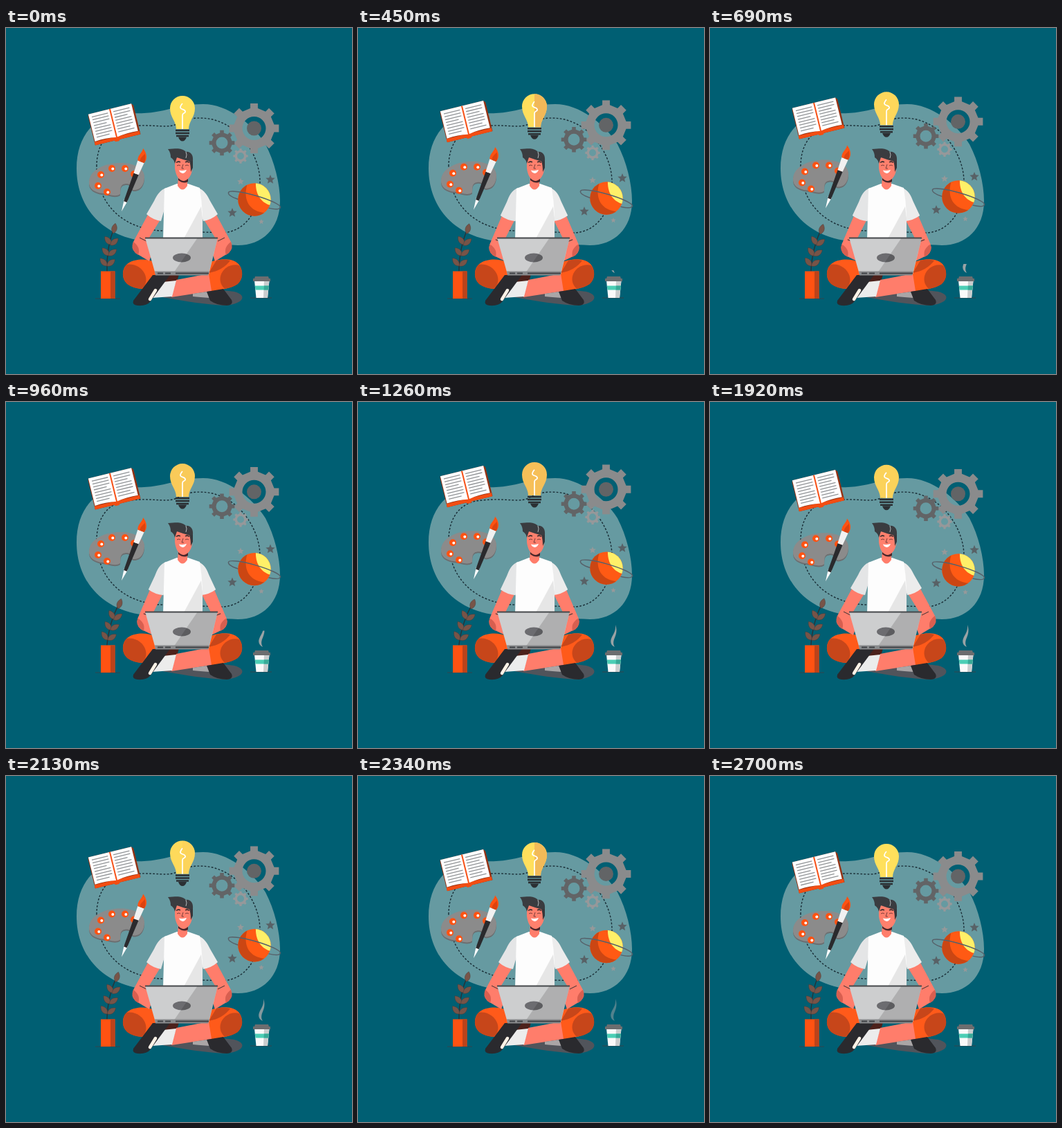
Recreate the animation shown at these times as an HTML page. Size 500x500 px, loop 2.73 s.

```html
<!DOCTYPE html>
<html lang="en">
<head>
<meta charset="utf-8">
<title>Creative work</title>
<style>
  html, body { margin: 0; width: 100%; height: 100%; overflow: hidden; background: #005f73; }
  svg { display: block; width: 100vw; height: 100vh; }
</style>
</head>
<body>
<svg viewBox="0 0 500 500">
  <defs>
    <clipPath id="planetClip"><circle cx="359" cy="248" r="23.7"/></clipPath>
    <clipPath id="bulbRight"><path d="M255 90H280V160H255Z"/></clipPath>
    <clipPath id="steamClip"><rect id="steamWindow" x="355" width="30" height="40"/></clipPath>
    <path id="bulbShape" d="M246 146C246 135 237 129 237 116A18 18 0 0 1 273 116C273 129 264 135 264 146Z"/>
    <path id="paletteShape" d="M120 222C121 205 143 195 165 195C186 195 200 203 200 215C200 226 195 233 187 234C178 235 184 226 175 225C163 225 166 234 165 240C158 245 148 240 140 239C128 238 119 232 120 222Z"/>
    <g id="limb">
      <path d="M206 268L184 309Q180 318 187 325L207 337L216 310L205 306L223 277Z" fill="#ff7d6b"/>
      <path d="M184 309Q180 318 187 325L191 328Q195 317 184 309Z" fill="#d85f50"/>
      <path d="M193 303L203 308" stroke="#3a3032"/>
    </g>
    <path id="sleeve" d="M232 231C222 234 218 242 214 250L203 269Q212 277 224 279L229 262Z"/>
  </defs>

  <path fill="#669aa1" d="M102 203C102 155 130 122 175 123C230 126 240 110 285 110C320 110 357 139 375 168C388 193 396 225 396 250C396 290 370 314 335 314C290 311 240 314 200 308C135 300 102 255 102 203Z"/>
  <path fill="none" stroke="#182c35" stroke-width="1.4" stroke-dasharray="2.8 2.3" d="M131 200C131 165 150 143 180 142C215 138 235 147 250 137C262 129 290 127 310 136C345 150 367 190 367 222C367 265 345 296 310 296C280 294 250 296 226 293C170 291 131 255 131 200Z"/>

  <g id="book"><g transform="translate(150 117) rotate(-13.8)">
    <path d="M-33 3L-32 0H32L34.500 3V46H-33Z" fill="#943416"/>
    <path d="M-33 41H34V46H4L2 48H-3L-5 46H-33Z" fill="#f24d12"/>
    <path d="M-32 0H32V40.500Q16 39 0 42Q-16 39 -32 40.500Z" fill="#fff"/>
    <path d="M0 0V43" stroke="#f65016" stroke-width="2"/>
    <path id="bookLines" stroke="#909396" stroke-width="1.3"/>
  </g></g>

  <g id="bulb">
    <use id="bulbGlass" href="#bulbShape"/>
    <use id="bulbShade" href="#bulbShape" fill="#f0b458" clip-path="url(#bulbRight)"/>
    <path d="M255 146V126C255 122 260 124 259 120C258 117 251 118 252 114Q253 111 255 109" fill="none" stroke="#fff" stroke-width="1.7"/>
    <path d="M245 148H265M245 152H265M246 156H264" stroke="#2b2f33" stroke-width="2.6"/>
    <path d="M249 157.500H261Q259 163.500 255 163.500Q251 163.500 249 157.500Z" fill="#2b2f33"/>
  </g>

  <g id="gears" fill-rule="evenodd"></g>

  <g id="palette">
    <use href="#paletteShape" y="2" fill="#6c6e70"/>
    <use href="#paletteShape" fill="#8b8b8b"/>
    <g id="paints"></g>
    <g transform="translate(167 265) rotate(21.3)">
      <path d="M0 0L-2.800 -18H2.800Z" fill="#fff"/>
      <path d="M-2.400 -15L-3.800 -58H3.800L2.400 -15Z" fill="#2a2a2d"/>
      <path d="M-3.800 -58L-5 -77H5L3.800 -58Z" fill="#f1f1f1"/>
      <path d="M-5 -77C-8 -85 -3 -88 -4 -96C3 -92 8 -85 5 -77Z" fill="#ff5212"/>
      <path d="M-1 -77C-4 -82 0 -85 1 -90C4 -85 6 -81 5 -77Z" fill="#dc4310"/>
    </g>
  </g>

  <g id="planet">
    <circle cx="359" cy="248" r="23.700" fill="#ff5a14"/>
    <g clip-path="url(#planetClip)">
      <path d="M350 222C341 246 350 265 374 267V274H335V222Z" fill="#cb4613"/>
      <path d="M361 222C360 242 370 254 385 257V222Z" fill="#fff068"/>
    </g>
    <path d="M-39 0A39 6.500 0 0 1 39 0M-39 0C-39 3 -33 5 -23 5.500M39 0C39 3 33 5 23 5.500" transform="translate(359 248.500) rotate(16)" fill="none" stroke="#56616a" stroke-width="1.500"/>
    <g id="stars"></g>
  </g>

  <path d="M129 391H165" stroke="#33454c"/>
  <g id="plant">
    <path d="M146 353C145 330 149 305 157 288" fill="none" stroke="#2b2f33" stroke-width="1.300"/>
    <g id="leaves" fill="#775448" stroke="#473a37" stroke-width=".4"></g>
  </g>
  <path d="M137 351.500H157.500V391H137Z" fill="#ff5212"/>
  <path d="M151 351.500H157.500V391H151Z" fill="#bc421a"/>

  <g clip-path="url(#steamClip)">
    <path id="steam" fill="#9aa3a5" d="M372 322C376 333 371 339 369.500 345C368.500 350 370 352 371 354C366 352 364 347 366 342C368 336 373 332 372 322Z"/>
  </g>
  <path d="M353 390H384" stroke="#33454c"/>
  <path d="M359 365H380.500L378 390H361.500Z" fill="#fafafa"/>
  <path d="M373 365H380.500L378 390H372Z" fill="#cacdce"/>
  <path d="M359.800 372.500H380L379 378.500H360.500Z" fill="#4bceb5"/>
  <path d="M373 372.500H380L379 378.500H372.600Z" fill="#38a997"/>
  <path d="M360 359H379L380 362H382V366H357V362H359Z" fill="#6c6d6f"/>

  <path d="M226 389C250 378 300 376 330 381C349 386 344 398 318 401C290 400 260 395 226 389Z" fill="#51545b"/>

  <path d="M214 338C200 331 169 333 169 355C169 374 190 379 215 377L230 350Z" fill="#ff5a1a"/>
  <path d="M174 342C167 350 167 363 175 370Q183 376 196 377C212 364 196 338 174 342Z" fill="#c7461a"/>
  <path d="M290 340C310 331 341 330 341 355C341 374 320 377 294 381Z" fill="#ff5a1a"/>
  <path d="M337 343C343 350 343 363 335 370Q328 375 316 377C300 362 316 338 337 343Z" fill="#c7461a"/>
  <path d="M293 354L304 336Q314 333 324 336Q314 350 293 354Z" fill="#c7461a"/>
  <path d="M216 356H250L246 370H216Z" fill="#4c211b"/>
  <path d="M246 364L293 355L297 380L239 389Z" fill="#ff7d6b"/>
  <path d="M270 384L291 381L294 390Q280 389 270 388Z" fill="#aaa6a7"/>
  <path d="M227 367L246 365L240 388L211 390Z" fill="#ececec"/>
  <path d="M212 357H237L208 396Q203 402 190 401Q182 400 184 394Z" fill="#2a2a2e"/>
  <path d="M208 392L216 379" stroke="#fff3e7" stroke-width="4.500" stroke-linecap="round"/>
  <path d="M290 381L314 377L326 393Q329 400 319 401Q305 401 295 394Z" fill="#2a2a2e"/>

  <g id="leftArm"><use href="#limb"/><use href="#sleeve" fill="#e4e5e6"/></g>
  <g transform="translate(509) scale(-1 1)">
    <g id="rightArm"><use href="#limb"/><use href="#sleeve" fill="#ececec"/></g>
  </g>
  <path d="M229 232L247 225Q255 229 263 225L280 231Q283 250 284 270V306H227Z" fill="#fdfdfd"/>
  <path d="M282 258L284 275V306H256Z" fill="#e6e6e6"/>

  <path d="M249 214H262V228Q255 239 248 228Z" fill="#ff7d6b"/>
  <path d="M249 216Q256 222 263 214V222Q257 226 249 220Z" fill="#4a262a"/>
  <path d="M244 189Q257 182 269 188V205C268 214 262 221 256 221C249 220 245 212 244 202Z" fill="#ff806d"/>
  <path d="M265 190H270V202L267 208Q267 198 265 192Z" fill="#35373b"/>
  <path d="M234 175C245 175 252 172 260 179C266 178 271 183 270 192L266 193Q255 190 247 187L244 196Q243 190 238 187Q238 180 234 175Z" fill="#3a3c40"/>
  <path d="M260 179Q262 183 260 188" fill="none" stroke="#c2c9ca" stroke-width=".9"/>
  <path d="M246 194.500Q249 192 252 194M259 194Q262 192 265 194.500" fill="none" stroke="#302b2e" stroke-width="1.500"/>
  <path d="M247 199Q250 197 252 199M259 199Q262 197 264 199M256 197L254 203H257" fill="none" stroke="#793d3b" stroke-width="1"/>
  <path d="M250 205.500Q255 207 261 205Q259 210 255 210Q251 209 250 205.500Z" fill="#fff"/>

  <path d="M201 303H306L293 356H216Z" fill="#cdcecf"/>
  <ellipse cx="254" cy="332" rx="13" ry="6.500" fill="#6c6c70"/>
  <path d="M277 303H306L293 354H242Z" fill="#000" opacity=".15"/>
  <path d="M201 303.500H306" stroke="#45484b" stroke-width="2"/>
  <path d="M215 351.500H294L292 357.500H216Z" fill="#898b8d"/>
  <path d="M219 354.500H227M230 354.500H238M245 354.500H293" stroke="#404347" stroke-width="2"/>
</svg>
<script>
const LOOP = 2730;
const $ = id => document.getElementById(id);
const polar = (cx, cy, r, a) => [cx + r * Math.cos(a), cy + r * Math.sin(a)].map(v => v.toFixed(2)).join(' ');
const circlePath = (x, y, r) => `M${x - r} ${y}a${r} ${r} 0 1 0 ${2 * r} 0a${r} ${r} 0 1 0 ${-2 * r} 0Z`;

function gear(x, y, outer, body, hole, color) {
  const points = [];
  for (let i = 0; i < 8; i++) {
    const a = i * Math.PI / 4;
    const half = outer * 0.15;
    for (const [r, side] of [[body, -1], [outer, -1], [outer, 1], [body, 1]])
      points.push(polar(x, y, r, a + side * Math.asin(half / r)));
  }
  return `<path fill="${color}" d="M${points.join('L')}Z${circlePath(x, y, hole)}"/>`;
}

function star(x, y, r, color) {
  const points = Array.from({ length: 10 }, (_, i) =>
    polar(x, y, i % 2 ? r * 0.45 : r, i * Math.PI / 5 - Math.PI / 2));
  return `<path fill="${color}" d="M${points.join('L')}Z"/>`;
}

const paint = ([x, y]) =>
  `<circle cx="${x}" cy="${y}" r="5" fill="#ff5212"/><circle cx="${x + 1.3}" cy="${y + .5}" r="2" fill="#fff"/>`;

const leaf = ([x, y, angle]) =>
  `<path transform="translate(${x} ${y}) rotate(${angle})" d="M0 0C-5 -4 -5 -10 0 -15C5 -10 5 -4 0 0Z"/>`;

$('gears').innerHTML =
  gear(358.5, 145, 36.3, 29.5, 17, '#8a8b8c') +
  '<circle cx="358.5" cy="145" r="10.5" fill="#626466"/>' +
  gear(312, 166, 18.5, 14.8, 8.5, '#626466') +
  gear(339, 185, 10.8, 8.6, 5, '#96989a');
$('stars').innerHTML =
  star(327, 267, 7, '#586166') + star(382, 219, 7, '#586166') +
  star(339, 222, 5.2, '#96999a') + star(369, 280, 4, '#96999a');
$('paints').innerHTML = [[137, 212], [153, 203], [172, 203], [133, 228], [146, 237], [185, 211]].map(paint).join('');
$('leaves').innerHTML = [
  [155, 297, 12], [152, 313, -38], [151, 314, 48], [149, 329, -42],
  [148, 329, 52], [146, 344, -42], [146, 344, 50]
].map(leaf).join('');
$('bookLines').setAttribute('d', Array.from({ length: 8 }, (_, i) => {
  const y = 5 + i * 4.3;
  return `M-28 ${y}H-${i % 4 == 3 ? 9 : 4}M4 ${y}H${i % 4 == 2 ? 23 : 28}`;
}).join(''));

const floats = { book: 17.6, bulb: 11.2, gears: 19, palette: 8.8, planet: 8 };
const clamp = v => Math.max(0, Math.min(1, v));
const mix = (a, b, k) => `rgb(${a.map((v, i) => Math.round(v + (b[i] - v) * k))})`;

function draw(now) {
  const t = now % LOOP;
  const lift = (1 - Math.cos(2 * Math.PI * t / LOOP)) / 2;

  for (const id in floats) $(id).setAttribute('transform', `translate(0 ${-floats[id] * lift})`);
  $('plant').setAttribute('transform', `rotate(${9 * lift} 146 351)`);

  $('bulbGlass').setAttribute('fill', mix([255, 224, 92], [246, 190, 88], lift * lift));
  $('bulbShade').setAttribute('opacity', clamp(1 - Math.abs(lift - .22) / .22));

  // Arms switch between two typing poses
  const swing = t >= 225 && t < 1590 ? -5 : 0;
  for (const id of ['leftArm', 'rightArm']) $(id).setAttribute('transform', `rotate(${swing} 228 238)`);

  // Steam rises out of the cup, then fades
  $('steamWindow').setAttribute('y', 355 - 34 * clamp((t - 330) / 880));
  $('steam').setAttribute('opacity', clamp((2680 - t) / 640));

  requestAnimationFrame(draw);
}
requestAnimationFrame(draw);
</script>
</body>
</html>
```
